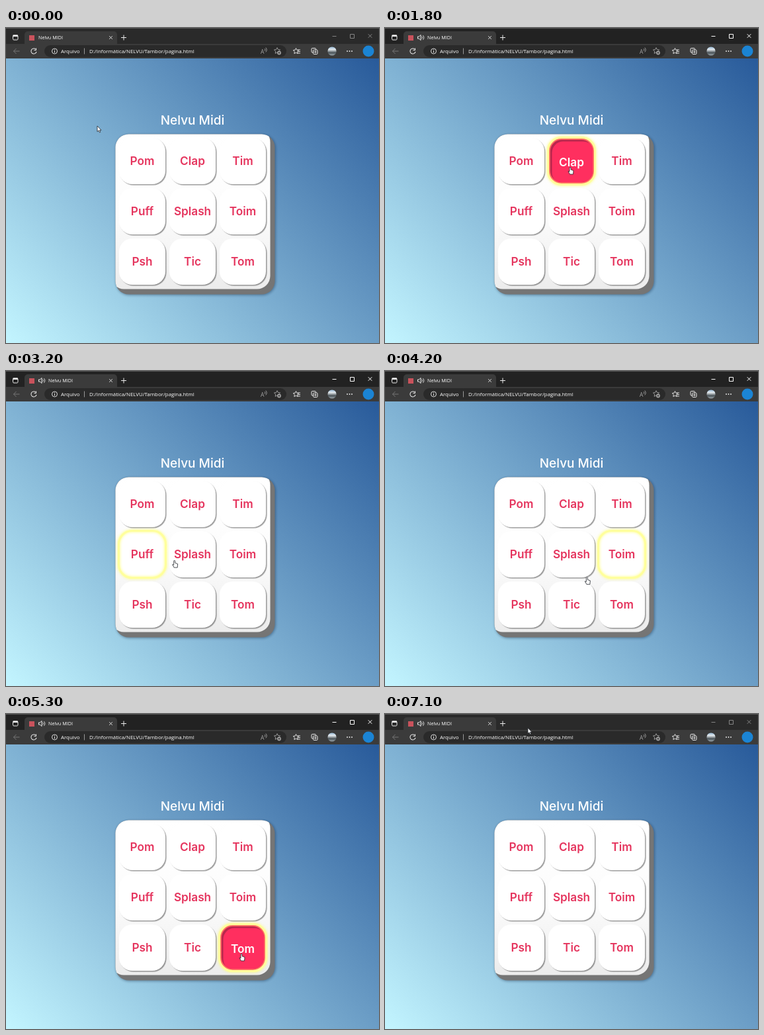
An HTML page with a canvas for the animation above (7200 ms loop, 564x476 px).

```html
<!DOCTYPE html>
<html lang="pt-BR">
<head>
<meta charset="utf-8">
<title>Nelvu MIDI</title>
<style>
html, body { margin: 0; width: 100%; height: 100%; overflow: hidden; }
canvas { display: block; }
</style>
</head>
<body>
<canvas id="stage" width="564" height="476"></canvas>
<script>
const ctx = document.getElementById('stage').getContext('2d');
const LOOP = 7200, STEP = 100, TAU = Math.PI * 2;
const UI = '"Open Sans", "Noto Sans", sans-serif';
const KEY_FONT = 'Inter, sans-serif';
const SIZE = 70, PITCH = 76, ROUND = 20;
const RED = '#ff2f5f', BAR = '#3b3b3b', FIELD = '#2a2a2a', INK = '#ececec', DIM = '#a5a5a5';

const keys = ['Pom', 'Clap', 'Tim', 'Puff', 'Splash', 'Toim', 'Psh', 'Tic', 'Tom']
  .map((label, i) => ({ label, x: 171 + i % 3 * PITCH, y: 166 + Math.floor(i / 3) * PITCH }));

// Every key is pressed once in reading order, then the middle one again
const HOLD = 200, MOVE = 300, AWAKE = 1000, ASLEEP = 7100, SOUND = 1300;
const REST = { x: 138, y: 148 }, EXIT = { x: 216, y: 21 };
const presses = [1000, 1800, 2400, 2900, 3500, 4000, 4500, 4900, 5300, 6100]
  .map((at, i) => ({ at, key: keys[i] || keys[4] }));

const tapPoint = key => ({ x: key.x + SIZE / 2 - 2, y: key.y + SIZE / 2 + 9 });

// The pointer leaves a key halfway through its press and glides to the next
function pointerAt(t) {
  const i = presses.findLastIndex(p => p.at <= t);
  if (i < 0) return REST;
  const from = tapPoint(presses[i].key), next = presses[i + 1];
  const to = next ? tapPoint(next.key) : EXIT;
  const k = Math.min(1, Math.max(0, t - presses[i].at - HOLD / 2) / (next ? MOVE : 800));
  return { x: from.x + (to.x - from.x) * k, y: from.y + (to.y - from.y) * k };
}

function box(x, y, w, h, r, fill) {
  ctx.beginPath();
  ctx.roundRect(x, y, w, h, r);
  if (fill) { ctx.fillStyle = fill; ctx.fill(); }
}

function disc(x, y, r, fill) {
  ctx.beginPath();
  ctx.arc(x, y, r, 0, TAU);
  ctx.fillStyle = fill;
  ctx.fill();
}

function stroke(color, width = 1) {
  ctx.strokeStyle = color;
  ctx.lineWidth = width;
  ctx.stroke();
}

function line(x0, y0, x1, y1, color, width) {
  ctx.beginPath();
  ctx.moveTo(x0, y0);
  ctx.lineTo(x1, y1);
  stroke(color, width);
}

function arc(x, y, r, from, to, color, width) {
  ctx.beginPath();
  ctx.arc(x, y, r, from, to);
  stroke(color, width);
}

function waves(x, y, color) {
  for (const r of [2.4, 4.7]) arc(x, y, r, -0.8, 0.8, color, 0.9);
}

function cross(x, y, r, color, width) {
  line(x - r, y - r, x + r, y + r, color, width);
  line(x - r, y + r, x + r, y - r, color, width);
}

function plus(x, y, r, color, width) {
  line(x - r, y, x + r, y, color, width);
  line(x, y - r, x, y + r, color, width);
}

function text(str, x, y, font, color, align = 'left') {
  ctx.font = font;
  ctx.fillStyle = color;
  ctx.textAlign = align;
  ctx.fillText(str, x, y);
}

function star(x, y, r, color) {
  ctx.beginPath();
  for (let i = 0; i < 10; i++) {
    const a = i * TAU / 10 - TAU / 4, d = i % 2 ? r * 0.5 : r;
    ctx.lineTo(x + d * Math.cos(a), y + d * Math.sin(a));
  }
  ctx.closePath();
  stroke(color, 0.9);
}

function speaker(x, y) {
  ctx.stroke(new Path2D(`M${x} ${y - 1.6}h2l2.6-2.4v8l-2.6-2.4h-2z`));
  waves(x + 4.6, y, INK);
}

function drawTabs(active, playing) {
  ctx.fillStyle = active ? '#222222' : FIELD;
  ctx.fillRect(0, 0, 564, 25);
  ctx.fillStyle = '#505050';
  ctx.fillRect(0, 0, 564, 1);
  box(28, 5, 140, 21, [5, 5, 0, 0], BAR);

  box(10.5, 11, 7.5, 7, 1.5);
  stroke(INK);
  ctx.fillStyle = INK;
  ctx.fillRect(10.5, 10.5, 7.5, 2.5);

  box(35, 11, 8, 8, 0, '#c9525c');
  if (playing) speaker(49.5, 14.5);
  text('Nelvu MIDI', playing ? 64 : 49, 17, `7.2px ${UI}`, '#ffffff');
  cross(158.5, 14.5, 2.3, INK, 0.9);
  plus(178, 14.5, 4, INK, 1);

  const control = active ? '#ffffff' : '#858585';
  line(493.5, 12.5, 499.5, 12.5, control);
  box(520.5, 9.5, 6, 6, 0);
  stroke(control);
  cross(550.5, 12, 2.8, control);
}

function drawToolbar() {
  ctx.fillStyle = BAR;
  ctx.fillRect(0, 24, 564, 22);
  box(58, 26, 366, 18, 9, FIELD);

  for (const dy of [-4, 4]) line(11.5, 35, 15.5, 35 + dy, '#777777');
  line(11.5, 35, 20.5, 35, '#777777');
  arc(42, 35, 4, 0.2, 5.4, INK, 1.1);
  line(45.5, 30.5, 45.5, 33.5, INK);
  line(42.5, 33.5, 45.5, 33.5, INK);

  arc(73.5, 35, 4, 0, TAU, INK, 0.9);
  line(73.5, 34.3, 73.5, 37.3, INK);
  line(73.5, 32.4, 73.5, 33.4, INK);
  text('Arquivo', 83, 38, `7.9px ${UI}`, '#ffffff');
  line(118.5, 30.5, 118.5, 39.5, '#999999');
  text('D:/Informática/NELVU/Tambor/pagina.html', 126, 38, `7.9px ${UI}`, '#ffffff');

  text('A', 385, 38.5, `8.5px ${UI}`, DIM);
  waves(389.5, 33, DIM);
  star(410, 34.5, 4.8, DIM);
  disc(413, 37.5, 2.9, DIM);
  plus(413, 37.5, 1.6, FIELD, 0.8);

  star(438.5, 35, 4.5, INK);
  for (const y of [33, 35.5, 38]) line(441, y, 445, y, INK, 0.9);
  for (const d of [0, 2.5]) {
    box(462 + d, 30.5 + d, 6.5, 6.5, 1.2, BAR);
    stroke(INK);
  }
  plus(467.7, 36.2, 2, INK, 0.9);

  const photo = ctx.createLinearGradient(0, 28, 0, 42);
  ['#8fb6d6', '#e2e8ec', '#4a5358', '#a9b4ba'].forEach((c, i) => photo.addColorStop(i / 3, c));
  disc(493, 35, 6.6, photo);

  for (const dx of [-3.5, 0, 3.5]) disc(519.5 + dx, 35, 0.9, INK);
  disc(548, 35, 8.5, '#1b84d4');
}

function drawPage() {
  // 45 degree blend, corner to corner of the 564 x 430 viewport
  const sky = ctx.createLinearGradient(33.5, 509.5, 530.5, 12.5);
  sky.addColorStop(0, '#c3f5ff');
  sky.addColorStop(1, '#285a9a');
  ctx.fillStyle = sky;
  ctx.fillRect(0, 46, 564, 430);
  text('Nelvu Midi', 282, 146, `500 19px ${KEY_FONT}`, '#ffffff', 'center');
}

// The grey edge lies inside the panel, along its right and bottom sides
function drawPanel() {
  const x = 165.5, y = 160.5, w = 241, h = 242;
  ctx.save();
  ctx.shadowColor = 'rgba(20, 45, 75, 0.5)';
  ctx.shadowBlur = 4;
  ctx.shadowOffsetX = ctx.shadowOffsetY = 1;
  box(x, y, w, h, ROUND, '#757575');
  ctx.restore();

  const face = ctx.createLinearGradient(0, y, 0, y + h);
  face.addColorStop(0, '#ffffff');
  face.addColorStop(0.5, '#fcfcfc');
  face.addColorStop(1, '#ebebeb');
  ctx.save();
  ctx.clip();
  box(x - 7, y - 8, w, h, ROUND, face);
  ctx.restore();
}

function drawKey({ x, y, label }, focused, pressed) {
  ctx.save();
  if (!focused) {
    ctx.shadowColor = 'rgba(0, 0, 0, 0.38)';
    ctx.shadowBlur = 1;
    ctx.shadowOffsetX = ctx.shadowOffsetY = 1.5;
  }
  box(x, y, SIZE, SIZE, ROUND, pressed ? RED : '#ffffff');
  ctx.restore();

  if (focused) {
    ctx.save();
    ctx.shadowColor = '#ffff70';
    ctx.shadowBlur = 4;
    box(x - 0.5, y - 0.5, SIZE + 1, SIZE + 1, ROUND);
    stroke('#ffff9c', 3);
    ctx.restore();
  }
  if (pressed) {
    const inner = SIZE - 6, r = ROUND - 3;
    box(x + 3, y + 3, inner, inner, r, '#b9274d');
    ctx.save();
    ctx.clip();
    box(x + 5.5, y + 5.5, inner, inner, r, RED);
    ctx.restore();
  }
  text(label, x + SIZE / 2, y + (pressed ? 43 : 41), `600 17.2px ${KEY_FONT}`,
    pressed ? '#ffffff' : '#e5355e', 'center');
}

function drawPointer({ x, y }, hand) {
  ctx.save();
  ctx.translate(x, y);
  ctx.lineJoin = 'round';
  const outline = new Path2D(hand
    ? 'M-1 1Q0-1 1 1V4L5 5.5 4.5 11H-.5L-3 6.5-1 7Z'
    : 'M0 0V8.6L2 6.8 3.4 9.8 4.8 9.2 3.5 6.3H6Z');
  ctx.fillStyle = '#ffffff';
  ctx.fill(outline);
  ctx.strokeStyle = '#20242a';
  ctx.lineWidth = 0.8;
  ctx.stroke(outline);
  ctx.restore();
}

function render(t) {
  const active = t >= AWAKE && t < ASLEEP;
  const last = active && presses.findLast(p => p.at <= t);
  const pointer = pointerAt(t);
  const inside = k => Math.abs(pointer.x - k.x - SIZE / 2) < SIZE / 2 &&
    Math.abs(pointer.y - k.y - SIZE / 2) < SIZE / 2;

  drawPage();
  drawTabs(active, t >= SOUND);
  drawToolbar();
  drawPanel();
  for (const key of keys) {
    const focused = last && last.key === key;
    drawKey(key, focused, focused && t < last.at + HOLD);
  }
  drawPointer(pointer, keys.some(inside));
}

const start = performance.now();
function tick() {
  const t = (performance.now() - start) % LOOP;
  render(Math.floor(t / STEP) * STEP);
  requestAnimationFrame(tick);
}
tick();
</script>
</body>
</html>
```
